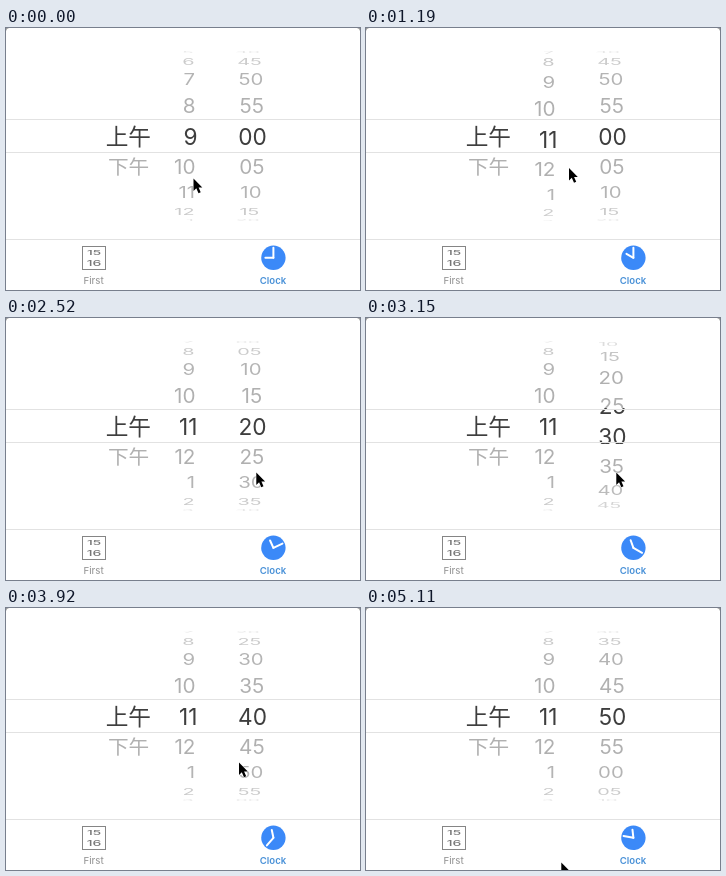
Animation, 354 px wide and 262 px high, one loop 5.18 s. Source, as an HTML page:

```html
<!DOCTYPE html>
<html lang="zh">
<head>
<meta charset="utf-8">
<title>Time picker</title>
<style>
html, body { margin: 0; width: 100%; height: 100%; overflow: hidden; background: #fff; }
svg { display: block; width: 354px; height: 262px; }
text { font-family: Inter, Roboto, "Noto Sans CJK SC", "Noto Sans CJK JP", "Noto Sans CJK", sans-serif; }
.dim { fill: #b0b0b0; }
.lit { fill: #3e3e3e; }
.han { font-weight: 300; }
.tab { font-size: 9.6px; font-weight: 500; text-anchor: middle; }
.tab.on { font-weight: 600; }
.day { font-size: 8px; font-weight: 500; fill: #777; text-anchor: middle; }
</style>
</head>
<body>
<svg viewBox="0 0 354 262">
  <defs>
    <clipPath id="outside"><path d="M0 0H354V90H0ZM0 126H354V211H0Z"/></clipPath>
    <clipPath id="band"><path d="M0 90H354V126H0Z"/></clipPath>
  </defs>
  <rect width="354" height="262" fill="#fff"/>
  <g id="dim" class="dim" clip-path="url(#outside)"></g>
  <g id="lit" class="lit" clip-path="url(#band)"></g>
  <path d="M0 91.5H354M0 124.5H354M0 211.5H354" stroke="#e2e2e2"/>
  <rect x="76.5" y="218.5" width="23" height="23" fill="none" stroke="#858585"/>
  <text class="day" transform="translate(88 226.5) scale(1.75 .8)">15</text>
  <text class="day" transform="translate(88 237.8) scale(1.75 .95)">16</text>
  <text class="tab" x="87.6" y="255.6" fill="#9c9c9c">First</text>
  <circle cx="267.4" cy="229.8" r="12.2" fill="#3b89f8"/>
  <g stroke="#fff" stroke-width="2" stroke-linecap="round">
    <path id="hour" d="M0 0V-8"/>
    <path id="minute" d="M0 0V-10"/>
  </g>
  <text class="tab on" x="267" y="255.6" fill="#4a92d8">Clock</text>
  <path d="M0 0H3Q.5 .5 0 3ZM354 0H351Q353.5 .5 354 3Z" fill="#999"/>
  <path id="cursor" d="M0 0V12.4L2.8 9.8L5 14.7L7.2 13.7L5.1 8.9H8.8Z"
    fill="#000" stroke="#fff" stroke-width="1" stroke-linejoin="round" paint-order="stroke"/>
</svg>
<script>
const LOOP = 5180, STEP = 70;
const MID = 108, RADIUS = 84, PITCH = .3683, ZOOM = 1.09, SIZE = 20.8;
const $ = id => document.getElementById(id);

const easeOut = p => 1 - (1 - p) ** 3;
const easeInOut = p => p < .5 ? 2 * p * p : 1 - 2 * (1 - p) ** 2;

// Each move is [start, end, value reached].
function track(t, value, moves, ease) {
  for (const [start, end, goal] of moves) {
    if (t <= start) break;
    value += (goal - value) * ease(Math.min(1, (t - start) / (end - start)));
  }
  return value;
}

const hourWheel = [[420, 770, 10], [980, 1372, 11]];
const minuteWheel = [[1540, 2060, 2], [2100, 2450, 4], [2940, 3410, 6], [3500, 3850, 8], [4760, 5080, 10]];
const clockHour = [[700, 980, 10], [1190, 1470, 11]];
const clockMinute = [[1890, 2170, 10], [2450, 2800, 20], [3220, 3500, 30], [3710, 4060, 40], [4900, 5250, 50]];
const cursorX = [[420, 910, 203], [1190, 1470, 250.3], [3570, 3850, 233], [4060, 4270, 243], [4760, 5110, 195.3]];
const cursorY = [[420, 910, 140], [1190, 1470, 154.5], [4060, 4270, 157], [4760, 5110, 254.5]];

const mod = (a, n) => (a % n + n) % n;

const wheels = [
  { x: 122.6, litX: 122.3, anchor: "middle", drift: 0, style: "han",
    at: () => 0, label: i => ["上午", "下午"][i] || "" },
  { x: 189.6, litX: 191.5, anchor: "end", drift: -2, style: "num",
    at: t => track(t, 9, hourWheel, easeOut), label: i => mod(i - 1, 12) + 1 },
  { x: 246.2, litX: 246.5, anchor: "middle", drift: -5, style: "num",
    at: t => track(t, 0, minuteWheel, easeOut), label: i => String(mod(i * 5, 60)).padStart(2, "0") }
];

function makeRow(layer, w) {
  const row = document.createElementNS("http://www.w3.org/2000/svg", "text");
  row.setAttribute("class", w.style);
  row.setAttribute("text-anchor", w.anchor);
  row.setAttribute("font-size", SIZE);
  row.setAttribute("y", SIZE * .364);
  return $(layer).appendChild(row);
}

for (const w of wheels) {
  w.dim = Array.from({ length: 9 }, () => makeRow("dim", w));
  w.lit = Array.from({ length: 3 }, () => makeRow("lit", w));
}

function placeRows(w, rows, value, x, zoom) {
  const first = Math.round(value) - (rows.length - 1) / 2;
  rows.forEach((row, n) => {
    const angle = (first + n - value) * PITCH;
    const cos = Math.cos(angle);
    const visible = Math.abs(angle) < Math.PI / 2;
    row.textContent = visible ? w.label(first + n) : "";
    if (!visible) return;
    const y = MID + .3 + RADIUS * Math.sin(angle);
    const sx = (1 - .08 * (1 - cos)) * zoom;
    row.setAttribute("transform",
      `translate(${x + w.drift * (1 - cos)} ${y}) scale(${sx} ${cos * zoom})`);
    row.setAttribute("opacity", Math.min(1, .2 + cos));
  });
}

function turn(id, degrees) {
  $(id).setAttribute("transform", `translate(267.4 229.8) rotate(${degrees})`);
}

function draw(t) {
  for (const w of wheels) {
    const value = w.at(t);
    placeRows(w, w.dim, value, w.x, 1);
    placeRows(w, w.lit, value, w.litX, ZOOM);
  }
  const h = track(t, 9, clockHour, easeInOut);
  const m = track(t, 0, clockMinute, easeInOut);
  turn("hour", h * 30 + m / 2);
  turn("minute", m * 6);
  const x = track(t, 187.5, cursorX, easeInOut);
  const y = track(t, 150.5, cursorY, easeInOut);
  $("cursor").setAttribute("transform", `translate(${x} ${y})`);
}

const begin = performance.now();
function tick() {
  const t = (performance.now() - begin) % LOOP;
  draw(Math.floor(t / STEP) * STEP);
  requestAnimationFrame(tick);
}
tick();
</script>
</body>
</html>
```
